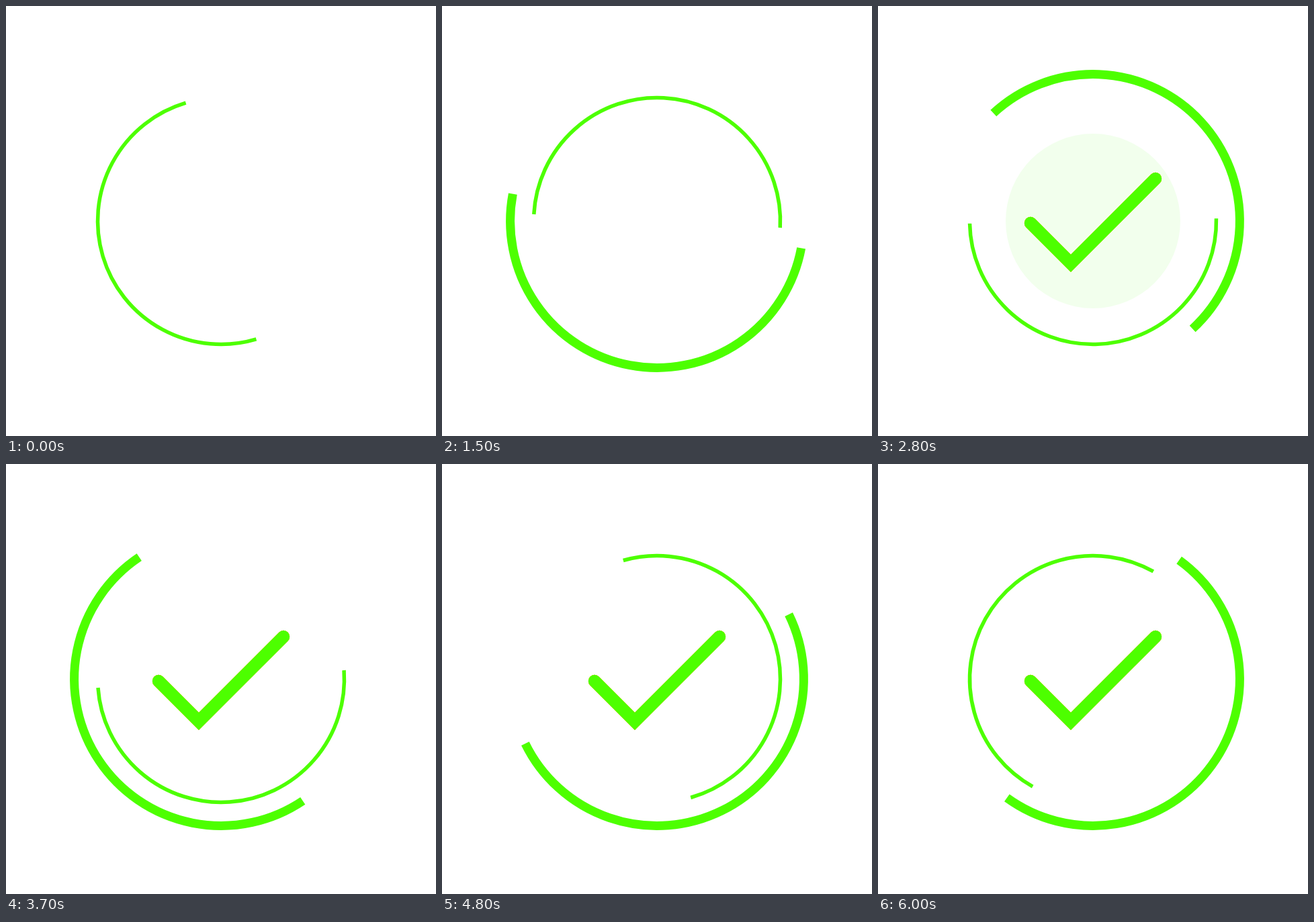
Recreate the animation shown at these times as an HTML page with a canvas. Size 640x640 px, loop 6.1 s.

```html
<!DOCTYPE html>
<html lang="en">
<head>
<meta charset="utf-8">
<title>Check mark</title>
<style>
  html, body { margin: 0; width: 100%; height: 100%; overflow: hidden; background: #fff; }
  canvas { display: block; width: 640px; height: 640px; }
</style>
</head>
<body>
<canvas id="stage" width="640" height="640"></canvas>
<script>
const ctx = document.getElementById('stage').getContext('2d');
const LOOP = 6100, STEP = 100, TICK = 40;
const GREEN = '#4dff00', YELLOW = '#fff700', RED = '#ff4000';
const C = 320, RAD = Math.PI / 180;
const CHECK = [[227, 323], [287, 383], [413, 257]];
const CHECK_LEN = Math.hypot(60, 60) + Math.hypot(126, 126);

const clamp = x => Math.min(1, Math.max(0, x));
const smooth = x => { x = clamp(x); return x * x * (3 - 2 * x); };
const progress = (t, start, span) => clamp((t - start) / span);

// Half circle running clockwise from the given angle
function halfRing(radius, width, deg) {
  ctx.lineWidth = width;
  ctx.lineCap = 'butt';
  ctx.strokeStyle = GREEN;
  ctx.beginPath();
  ctx.arc(C, C, radius, deg * RAD, (deg + 180) * RAD);
  ctx.stroke();
}

function checkMark(color, p) {
  if (p <= 0) return;
  ctx.lineWidth = 18.4;
  ctx.lineCap = 'round';
  ctx.strokeStyle = color;
  ctx.setLineDash(p < 1 ? [CHECK_LEN * p, CHECK_LEN * 2] : []);
  ctx.beginPath();
  CHECK.forEach(([x, y]) => ctx.lineTo(x, y));
  ctx.stroke();
  ctx.setLineDash([]);
}

function pulse(p) {
  if (p <= 0 || p >= 1) return;
  ctx.globalAlpha = 0.18 * Math.sin(Math.PI * p ** 1.25) ** 2;
  ctx.fillStyle = GREEN;
  ctx.beginPath();
  ctx.arc(C, C, 130 * smooth(p / 0.7), 0, 2 * Math.PI);
  ctx.fill();
  ctx.globalAlpha = 1;
}

const thinAngle = t => 73.4 - 412.35 * t;

// Starts at rest at the top and keeps speeding up towards a limit
const thickAngle = t =>
  -96.85 + 350 * t - 1193 * (1 - Math.exp(-0.285 * t))
  + 5.75 * Math.exp((0.08 - t) / 0.3);

function draw(t) {
  ctx.clearRect(0, 0, 640, 640);
  halfRing(183.5, 5.5, thinAngle(t));
  if (t > 0) halfRing(218.4, 13, thickAngle(t));
  checkMark(RED, progress(t, 1.56, 0.64));
  checkMark(YELLOW, progress(t, 1.64, 0.64));
  pulse(progress(t, 1.88, 0.8));
  pulse(progress(t, 2.14, 0.8));
  checkMark(GREEN, progress(t, 1.84, 0.64));
}

const begin = performance.now();
function loop(now) {
  const ms = Math.max(0, now - begin) % LOOP;
  const held = Math.floor(ms / STEP) * STEP;
  draw(Math.floor(held / TICK) * TICK / 1000);
  requestAnimationFrame(loop);
}
loop(begin);
</script>
</body>
</html>
```
